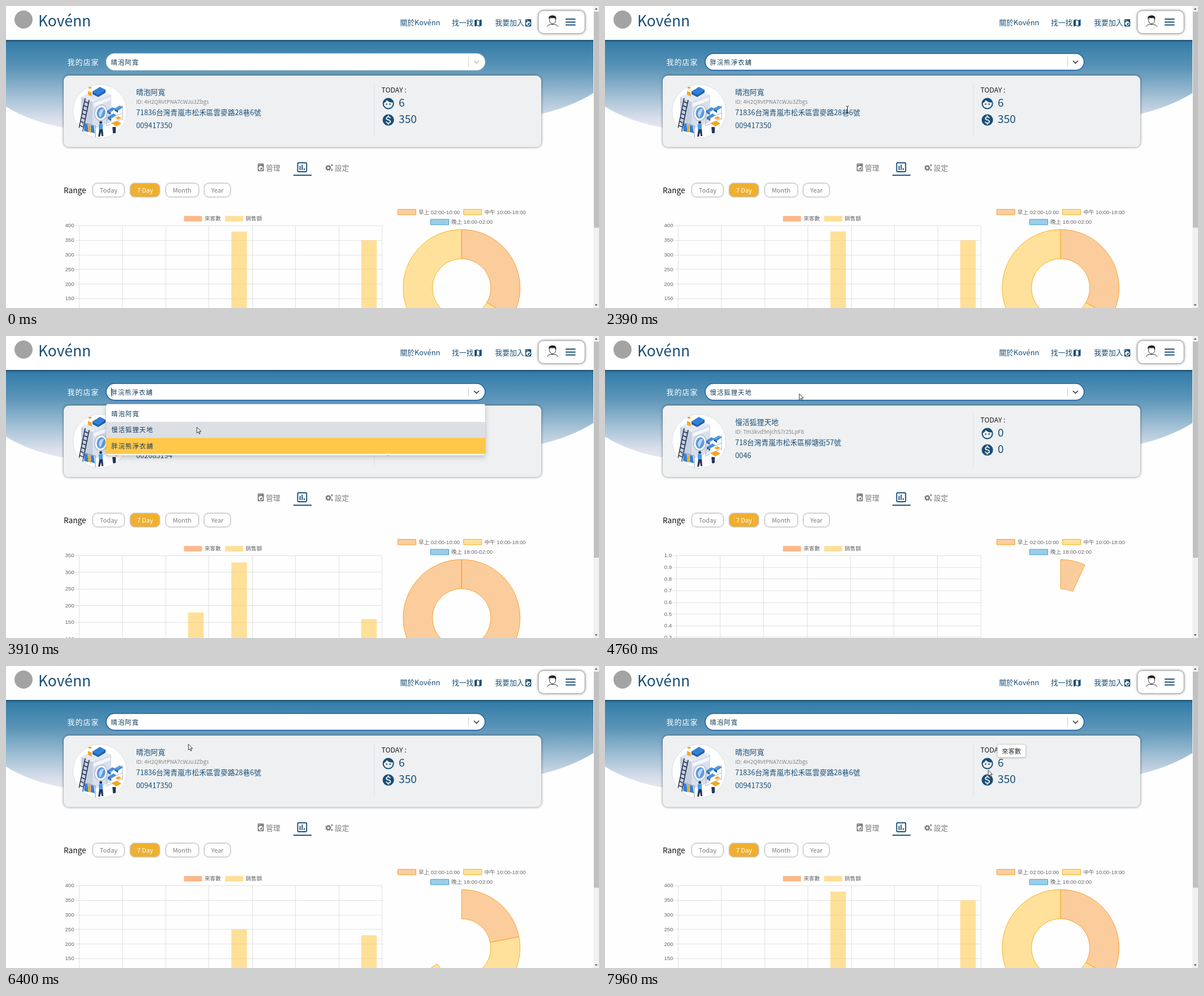
Write an HTML page that moves like this. It is 1048x534 px and loops after 8 s.

```html
<!DOCTYPE html>
<html lang="zh-Hant">
<head>
<meta charset="utf-8">
<title>Store dashboard</title>
<style>
html, body { margin: 0; width: 100%; height: 100%; overflow: hidden; background: #fefefe; }
svg { display: block; width: 1048px; height: 534px; font: 12.8px "Noto Sans CJK TC", "Noto Sans CJK SC", "Noto Sans CJK JP", sans-serif; }
.ink { fill: #184e77; }
.gray { fill: #7d7d7d; }
.chart { font: 9.6px "Liberation Sans", "Noto Sans CJK TC", "Noto Sans CJK SC", sans-serif; fill: #666; }
.pick { font-size: 11.2px; letter-spacing: 1.2px; fill: #123c5c; }
.pill { font-size: 11px; text-anchor: middle; fill: #7d7d7d; }
.pill rect { fill: #fff; stroke: #c0c0c0; filter: drop-shadow(0 0 1.2px #0004); }
.pill .on { fill: #efb02f; }
.raised { filter: drop-shadow(0 0 2px #0008); }
.menu { filter: drop-shadow(0 3px 4px #0003); }
</style>
</head>
<body>
<svg viewBox="0 0 1048 534">
  <defs>
    <linearGradient id="sky" gradientUnits="userSpaceOnUse" x1="0" y1="60" x2="0" y2="218">
      <stop offset="0" stop-color="#2f7aa7"/><stop offset=".32" stop-color="#5c95b8"/>
      <stop offset=".63" stop-color="#a2c0d5"/><stop offset=".88" stop-color="#d9dfeb"/>
      <stop offset="1" stop-color="#e8e9f2"/>
    </linearGradient>
    <path id="washer" d="M9.17 16.83c1.56 1.56 4.1 1.56 5.66 0 1.56-1.56 1.56-4.1 0-5.66l-5.66 5.66zM18 2.01L6 2c-1.11 0-2 .89-2 2v16c0 1.11.89 2 2 2h12c1.11 0 2-.89 2-2V4c0-1.11-.89-1.99-2-1.99zM10 4c.55 0 1 .45 1 1s-.45 1-1 1-1-.45-1-1 .45-1 1-1zM7 4c.55 0 1 .45 1 1s-.45 1-1 1-1-.45-1-1 .45-1 1-1zm5 16c-3.31 0-6-2.69-6-6s2.69-6 6-6 6 2.69 6 6-2.69 6-6 6z"/>
    <clipPath id="disc"><circle cx="166" cy="186" r="47"/></clipPath>
  </defs>

  <!-- page background and header -->
  <path fill="url(#sky)" d="M0 60H1038V154Q1000 178 946 191L700 230H200L102 215Q42 204 0 178Z"/>
  <path fill="#fff" style="filter:drop-shadow(0 1px 2px #0009)" d="M-9-9H1047V60H-9Z"/>
  <circle cx="31" cy="24" r="16" fill="#a3a3a3"/>
  <g class="ink">
    <text x="57" y="35.5" font-size="26.4">Kovénn</text>
    <text x="696.5" y="34">關於Kovénn</text>
    <text x="788" y="34">找一找</text>
    <text x="864.3" y="34">我要加入</text>
    <path transform="translate(825.9 21.6) scale(.7)" d="M20.5 3L15 5.1 9 3 3.4 4.9 3 5.4V20.5l.5.5L9 18.9l6 2.1 5.6-1.9.4-.5V3.5zM15 19l-6-2.1V5l6 2.1z"/>
    <use href="#washer" transform="translate(915.2 21.9) scale(.65)"/>
  </g>
  <rect class="raised" x="941" y="8.3" width="82" height="40.2" rx="9" fill="#fff" stroke="#a5a5a5" stroke-width=".8"/>
  <circle cx="966" cy="27.5" r="13" fill="#fff" stroke="#e8e8e8"/>
  <path d="M956.5 36.500q1-3.500 6-4h5q7 .5 8 4" fill="#fff" stroke="#333"/>
  <ellipse cx="966" cy="25.500" rx="5.500" ry="6" fill="#fff" stroke="#333"/>
  <path d="M959.500 23.500q-1.500-4.500 2-6q6-2.500 10 1q1.500 2 .5 6l-2-3.500q-5 1-8.500-.5z" fill="#222"/>
  <path class="ink" d="M989 22.300h17.500v2H989zM989 27.400h17.500v2H989zM989 32.500h17.500v2H989z"/>
  <text x="108.500" y="104.200" fill="#fff" font-weight="500" letter-spacing="1.2">我的店家</text>

  <!-- scrollbar -->
  <path fill="#f1f1f1" d="M1038 0h10v534h-10z"/>
  <path fill="#505050" d="M1040.500 6.500l2.500-3 2.500 3zM1040.500 527.500l2.500 3 2.500-3z"/>
  <path id="thumb" d="M1039 10h9v382h-9z"/>

  <!-- store card -->
  <rect class="raised" x="102" y="123" width="844" height="126.500" rx="9" fill="#eef0f2"/>
  <path stroke="#e0e2e5" d="M651 137v94"/>
  <circle cx="166" cy="186" r="47.500" fill="#fff" stroke="#dcdfe4"/>
  <g clip-path="url(#disc)">
    <path fill="#e4e9f2" d="M133 161l24-13 29 9-26 13z"/>
    <path fill="#c5cfdf" d="M133 161l20 8v49l-20-10z"/>
    <path fill="#d9e0eb" d="M153 169l33-12v48l-33 13z"/>
    <path fill="#f4f6fa" d="M155 172l29-11v6l-29 11z"/>
    <path fill="#2f80d8" d="M153 151l13-8 10 5-13 9z"/>
    <path fill="#1f5fae" d="M153 151l10 6v4l-10-5zM176 148l-13 9v4l13-8z"/>
    <path fill="#f5a623" d="M145 150l6 3 1 7-7-3zM146 143h5v3h-5z"/>
    <ellipse cx="168" cy="189" rx="11" ry="14" fill="#f6f8fb" stroke="#9aa8bf" transform="rotate(12 168 189)"/>
    <ellipse cx="168" cy="189" rx="7.500" ry="10" fill="#5d9bdf" transform="rotate(12 168 189)"/>
    <path fill="#bcd8f5" d="M164 189q4-9 9-7l-6 15q-3-2-3-8z"/>
    <path stroke="#23304f" stroke-width="1.500" fill="none" d="M140 163l-13 63M147 166l-13 64M139 169l7 3M137.500 176l7 3M136 183l7 3M134.500 190l7 3M133 197l7 3M131.500 204l7 3M130 211l7 3"/>
    <path fill="#3d8fe0" d="M179 185l9-6 6 3-9 6zM192 181l9-5 6 3-9 6zM180 196l10-6 5 3-9 6z"/>
    <path fill="#1f5fae" d="M179 185l6 3v4l-6-3zM192 181l6 4v4l-6-4zM180 196l6 3v4l-6-3z"/>
    <path stroke="#aab4c6" fill="none" d="M178 190l28-14M178 202l28-13M178 190v22M206 176v26M178 212l28-13"/>
    <path fill="#f5a623" d="M186 207l10-4 8 5-9 5zM193 198l6-3 5 3-6 3z"/>
    <path stroke="#7d8aa3" fill="none" d="M136 206l22 6M136 206v20M158 212v20"/>
    <path fill="#2f80d8" d="M139 208l5 1 2 14-8-2zM150 211l5 1 2 13-7-2z"/>
    <path fill="#f5a623" d="M145 210l4 1 1 13-5-2z"/>
    <path fill="#24365e" d="M165 217h6l1 13h-3l-1-7-2 8h-3zM188 214h6v11h-5z"/>
    <path fill="#4d9be8" d="M164 209h7v9h-7z"/>
    <circle cx="167.500" cy="206" r="2.500" fill="#24365e"/>
  </g>
  <text x="663.500" y="153" font-size="12.2" fill="#1b1b1b">TODAY :</text>
  <g class="ink" fill-rule="evenodd">
    <path transform="translate(663.700 160.600)" d="M12 2C6.480 2 2 6.480 2 12s4.480 10 10 10 10-4.480 10-10S17.520 2 12 2zm0 18c-4.410 0-8-3.590-8-8 0-.29.02-.58.05-.86 2.360-1.050 4.230-2.980 5.210-5.370C11.070 8.330 14.050 10 17.420 10c.78 0 1.530-.09 2.250-.26.21.71.33 1.470.33 2.260 0 4.410-3.590 8-8 8z"/>
    <circle cx="672.700" cy="173.600" r="1.300"/><circle cx="678.700" cy="173.600" r="1.300"/>
    <path transform="translate(663.700 189.500)" d="M12 2C6.480 2 2 6.480 2 12s4.480 10 10 10 10-4.480 10-10S17.520 2 12 2zm1.410 16.090V20h-2.670v-1.930c-1.710-.36-3.160-1.460-3.270-3.400h1.960c.1 1.050.82 1.870 2.650 1.870 1.960 0 2.400-.98 2.400-1.590 0-.83-.44-1.610-2.670-2.140-2.480-.6-4.180-1.620-4.180-3.670 0-1.720 1.390-2.840 3.110-3.210V4h2.670v1.950c1.860.45 2.790 1.860 2.850 3.390H14.300c-.05-1.110-.64-1.870-2.220-1.870-1.500 0-2.400.68-2.400 1.640 0 .84.65 1.390 2.670 1.910s4.180 1.390 4.180 3.910c-.01 1.830-1.380 2.830-3.120 3.160z"/>
  </g>

  <!-- tabs and range -->
  <g class="gray">
    <use href="#washer" transform="translate(442.100 277.200) scale(.68)"/>
    <text x="459.300" y="290.500">管理</text>
    <text x="580.700" y="290.500">設定</text>
  </g>
  <g fill="none" stroke="#7d7d7d">
    <circle cx="569.600" cy="286.200" r="3" stroke-width="2.200"/>
    <circle cx="569.600" cy="286.200" r="4.400" stroke-width="1.500" stroke-dasharray="2 1.456"/>
    <circle cx="576" cy="281.500" r="1.100" stroke-width="1.200"/>
    <circle cx="576" cy="290" r="1.100" stroke-width="1.200"/>
  </g>
  <rect x="515.500" y="277.200" width="15.800" height="15.800" rx="1.500" fill="none" stroke="#184e77" stroke-width="1.900"/>
  <path stroke="#184e77" stroke-width="1.900" d="M519.700 283v7M523.400 280.500v9.500M527.100 287v3M508 299.200h32"/>
  <text x="102" y="331" font-size="13.600" fill="#111">Range</text>
  <g class="pill">
    <rect x="153.500" y="313.500" width="55.500" height="24" rx="8"/><text x="181.300" y="330">Today</text>
    <rect x="219.500" y="313.500" width="52" height="24" rx="8" class="on"/><text x="245.700" y="330" fill="#fff" font-weight="500">7 Day</text>
    <rect x="282.500" y="313.500" width="58" height="24" rx="8"/><text x="311.200" y="330">Month</text>
    <rect x="350.500" y="313.500" width="46" height="24" rx="8"/><text x="373.500" y="330">Year</text>
  </g>

  <!-- legends -->
  <g class="chart">
    <path fill="#fbb98a" d="M314.500 371.300h32v9.600h-32z"/><text x="351" y="379.300">來客數</text>
    <path fill="#fddf98" d="M387.300 371.300h32v9.600h-32z"/><text x="423.500" y="379.300">銷售額</text>
    <path fill="#fccd9c" stroke="#f59f33" d="M692.400 359.500h32v9.600h-32z"/><text x="729" y="367.500">早上 02:00-10:00</text>
    <path fill="#ffe19b" stroke="#f5b21c" d="M808.700 359.500h32v9.600h-32z"/><text x="845.500" y="367.500">中午 10:00-18:00</text>
    <path fill="#9bcfe9" stroke="#4599cc" d="M750.500 377.200h32v9.600h-32z"/><text x="787" y="385.300">晚上 18:00-02:00</text>
  </g>

  <g id="live"></g>
</svg>
<script>
const LOOP = 8000;
const stores = [
  { name: '晴泡阿寬', id: '4H2QRvtPNA7cWJu3Zbgs', addr: '71836台灣青嵐市松禾區雲麥路28巷6號', tel: '009417350',
    guests: 6, sales: 350, max: 400, step: 50, left: 129, bars: [0, 0, 0, 380, 0, 0, 350], arcs: [120, 240] },
  { name: '慢活狐狸天地', id: 'Tm3kvd9njchS7r25LpF8', addr: '718台灣青嵐市松禾區柳塘街57號', tel: '0046',
    guests: 0, sales: 0, max: 1, step: .1, left: 126.5, bars: [0, 0, 0, 0, 0, 0, 0], arcs: [0, 0] },
  { name: '胖浣熊淨衣舖', id: 'Vc5hyt8gkwqD2n47JsB6', addr: '718台灣青嵐市松禾區星葉街16號', tel: '002685194',
    guests: 2, sales: 160, max: 350, step: 50, left: 129, bars: [0, 0, 180, 330, 0, 0, 160], arcs: [360, 0] }
];
// [time, store]
const picks = [[0, 0], [2120, 2], [4090, 1], [6060, 0]];
const loads = [[-2000, 0], [2500, 2], [4272, 1], [6166, 0]];
const menus = [[1250, 2120], [3570, 4090], [5330, 6060]];
const clicks = menus.flat();
// [time, x, y]
const path = [
  [400, 1043, 215], [1160, 751, 98], [1420, 751, 98], [2000, 436, 196], [2130, 436, 196],
  [2360, 428, 183], [2750, 428, 183], [3480, 409, 97], [3590, 409, 97], [3910, 337, 161],
  [4150, 337, 161], [4720, 343, 102], [5600, 343, 102], [5900, 322, 138], [6420, 322, 138],
  [7400, 677, 171], [7790, 677, 171], [7960, 677, 184], [LOOP, 677, 184]
];

const live = document.getElementById('live');
const thumb = document.getElementById('thumb');
const mix = (a, b, k) => a + (b - a) * k;
const crisp = v => Math.floor(v) + .5;
const lastIndex = (list, t) => list.findLastIndex(e => e[0] <= t);
const text = (x, y, s, attrs = '') => `<text x="${x}" y="${y}" ${attrs}>${s}</text>`;
const rect = (x, y, w, h, attrs) => `<rect x="${x}" y="${y}" width="${w}" height="${h}" ${attrs}/>`;

function pointer(t) {
  const i = Math.min(lastIndex(path, t), path.length - 2);
  const [a, b] = [path[i], path[i + 1]];
  const p = (t - a[0]) / (b[0] - a[0]);
  const k = p * p * (3 - 2 * p);
  return [mix(a[1], b[1], k), mix(a[2], b[2], k)];
}

function card(s) {
  return `<g class="ink">${text(230, 156.7, s.name)}${text(230, 193.2, s.addr, 'font-size="12.68"')}${text(230, 216, s.tel)}
    ${text(694, 178.3, s.guests, 'font-size="19.2"')}${text(694, 207.3, s.sales, 'font-size="19.2"')}</g>
    ${text(230, 173, 'ID: ' + s.id, 'font-size="9.6" fill="#858585"')}`;
}

function barChart(s, old, k) {
  const top = 388.5, height = 206.4, right = 664.5, col = (right - s.left) / 7;
  let lines = '', out = '';
  for (let i = 0; i < 8; i++) {
    const y = top + height * s.step / s.max * i;
    const value = s.max - s.step * i;
    lines += `M${s.left - 7} ${crisp(y)}H${right}M${crisp(s.left + col * i)} ${top}V534`;
    out += text(s.left - 8.5, y + 2.8, s.max > 1 ? value : value.toFixed(1), 'text-anchor="end"');
  }
  s.bars.forEach((v, i) => {
    const h = height * mix(old.bars[i] / old.max, v / s.max, k);
    out += rect(s.left + col * (i + .52), top + height - h, col * .36, h, 'fill="#ffcd56" fill-opacity=".6"');
  });
  return `<g class="chart"><path stroke="#000" stroke-opacity=".11" d="${lines}"/>${out}</g>`;
}

function wedge(from, size, fill, stroke) {
  if (size < .05) return '';
  const to = from + Math.min(size, 359.99);
  const at = (r, a) => `${805.2 + r * Math.sin(a * Math.PI / 180)} ${498.5 - r * Math.cos(a * Math.PI / 180)}`;
  const big = +(size > 180);
  return `<path fill="${fill}" stroke="${stroke}" d="M${at(103.2, from)}A103.2 103.2 0 ${big} 1 ${at(103.2, to)}
    L${at(51.6, to)}A51.6 51.6 0 ${big} 0 ${at(51.6, from)}Z"/>`;
}

function doughnut(s, old, k) {
  const [a, b] = s.arcs.map((v, i) => mix(old.arcs[i], v, k));
  return wedge(a, b, '#ffe19b', '#f5b21c') + wedge(0, a, '#fccd9c', '#f59f33');
}

function select(t, chosen, open, y) {
  const focus = t >= 1450;
  const border = focus ? 'stroke="#1f63aa" stroke-width="1.6"' : 'stroke="#dde5ea" stroke-width=".8"';
  let out = rect(177, 84, 669.7, 29.6, `rx="14.8" fill="#fff" ${border}`)
    + `<path stroke="#ccc" d="M817.5 91v16"/>
       <path fill="none" stroke="${focus ? '#444' : '#c4c4c4'}" stroke-width="1.7" stroke-linecap="round" d="M827.5 97.3l4 4 4-4"/>`
    + text(185.5, 103.5, stores[chosen].name, 'class="pick"');
  if (!open) return out;
  if ((t - open[0]) % 1000 < 500) out += '<path stroke="#222" d="M186.5 91.5v15"/>';
  out += rect(177, 120.2, 670, 91, 'rx="3" fill="#fff" stroke="#000" stroke-opacity=".1" class="menu"');
  stores.forEach((s, i) => {
    const top = 123.4 + 28.4 * i;
    const fill = i === chosen ? '#ffc84a' : y >= top && y < top + 28.4 ? '#dcdfe3' : '#fff';
    out += rect(177, top, 670, 28.4, `fill="${fill}"`) + text(186.3, top + 18.6, s.name, 'class="pick"');
  });
  return out;
}

function cursor(t, x, y, open) {
  const ring = clicks.some(c => t >= c && t < c + 200)
    ? `<circle cx="${x}" cy="${y}" r="9.5" fill="#f8ea1c" fill-opacity=".88"/>` : '';
  const onText = !open && x > 230 && x < 452 && y > 179 && y < 197;
  const shape = onText
    ? '<path fill="none" stroke="#222" d="M-2 -6h1.5l1 1 1-1H3M.5-5V5M-2 6h1.5l1-1 1 1H3"/>'
    : '<path fill="#fff" stroke="#222" stroke-width=".9" d="M.3.2V10.6L2.8 8.3 4.5 12.2 6.1 11.5 4.5 7.7H7.8Z"/>';
  return `${ring}<g transform="translate(${x} ${y})">${shape}</g>`;
}

function tooltip() {
  return rect(693.5, 138.5, 50, 23, 'rx="3" fill="#fff" stroke="#cfcfcf" style="filter:drop-shadow(0 1px 1.5px #0003)"')
    + text(701.5, 154.5, '來客數', 'font-size="11.2" fill="#333"');
}

function draw(t) {
  const n = lastIndex(loads, t);
  const s = stores[loads[n][1]], old = stores[loads[Math.max(n - 1, 0)][1]];
  const p = Math.min((t - loads[n][0]) / 1000, 1);
  const k = 1 - (1 - p) ** 4;
  const chosen = picks[lastIndex(picks, t)][1];
  const open = menus.find(([a, b]) => t >= a && t < b);
  const shown = t >= 430;
  const [x, y] = shown ? pointer(t) : [0, 0];
  thumb.setAttribute('fill', x > 1038 ? '#a8a8a8' : '#c1c1c1');
  live.innerHTML = card(s) + barChart(s, old, k) + doughnut(s, old, k) + select(t, chosen, open, y)
    + (t >= 7430 ? tooltip() : '') + (shown ? cursor(t, x, y, open) : '');
}

const start = performance.now();
function tick() {
  draw((performance.now() - start) % LOOP);
  requestAnimationFrame(tick);
}
tick();
</script>
</body>
</html>
```
